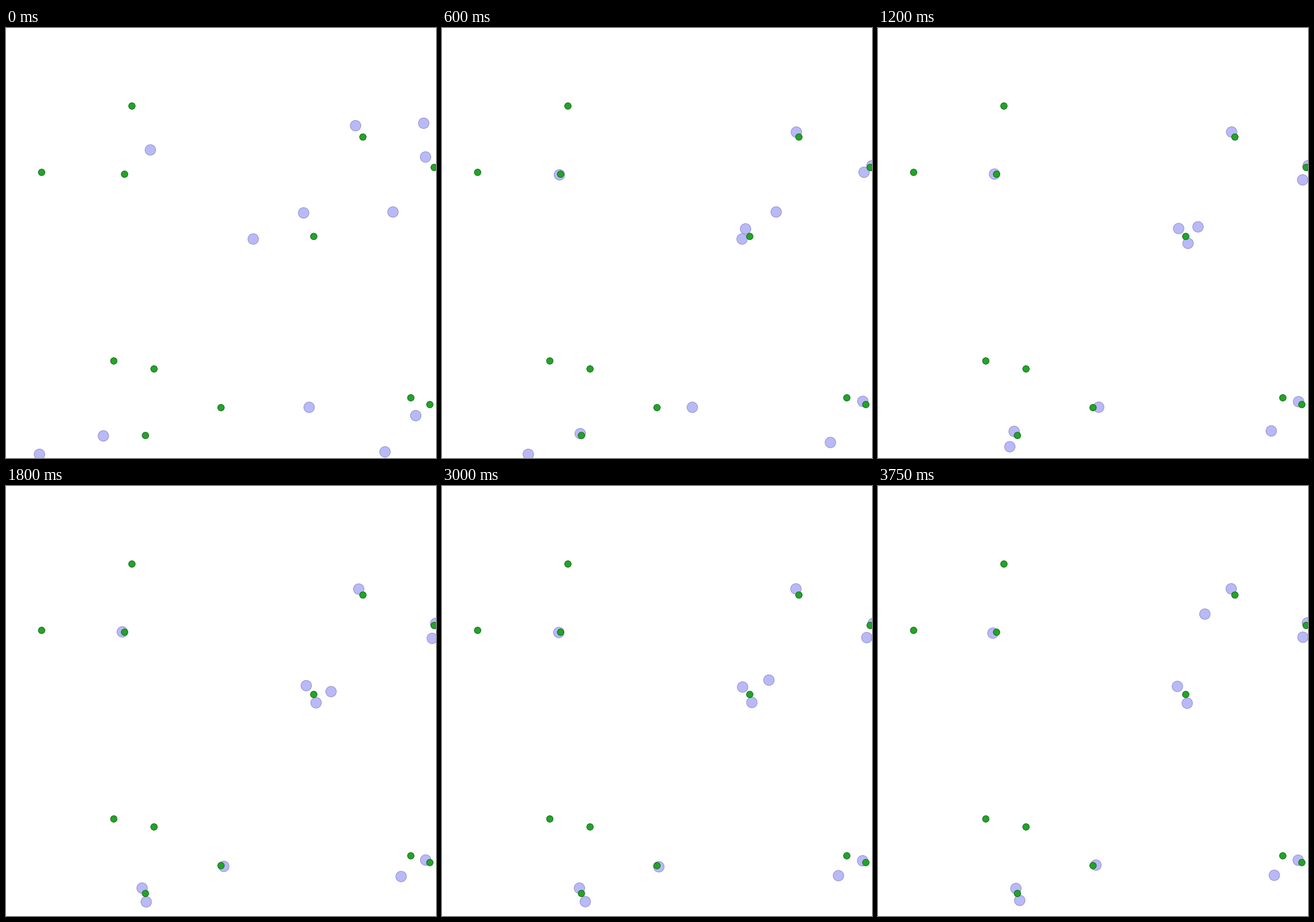
A matplotlib script for the animation above (3900 ms loop, 700 px wide and 700 px high).

```python
import math

import matplotlib.pyplot as plt
import numpy as np
from matplotlib.animation import FuncAnimation
from matplotlib.patches import Circle

SIZE = 700
FRAMES = 26
INTERVAL = 150
SPEED = 21.5    # pixels per step
SLOW = 5.4
CRUISE = 6      # most steps spent on one compass heading
PULL = 0.4      # share of the way to the resting place covered per step
WOBBLE = 0.8
DEPARTURE = 19  # step at which the restless agent sets off again

SITES = [(205, 127), (193, 238), (58, 235), (581, 177.5), (697, 227),
         (501, 339.3), (175.5, 542), (241, 555), (350, 618), (227, 663.3),
         (659, 602), (690, 613)]

# Start and resting place of each agent.
AGENTS = [
    ((569, 159), (575.7, 167.8)),
    ((680, 155), (693.5, 247.5)),
    ((683, 210), (699.3, 223)),
    ((235, 198.5), (189, 238)),
    ((484.5, 301), (488, 326)),
    ((402.5, 343.5), (504, 353)),
    ((493.5, 617.5), (354, 619)),
    ((667, 631), (684, 609)),
    ((158.5, 664), (223.5, 656)),
    ((54.5, 694), (232, 675.5)),
]
SLOW_AGENT = ((617, 690), (645.5, 634))
RESTLESS_AGENT = ((630, 299.5), (531, 337))
NEW_REST = (572, 186)

rng = np.random.default_rng(4)


def track(start, rest, steps=FRAMES - 1, speed=SPEED):
    """Head for the site by the rest along one of 8 compass headings,
    then ease into the rest and wobble there."""
    pos, rest = np.array(start, float), np.array(rest, float)
    site = np.array(min(SITES, key=lambda s: math.dist(s, rest)))
    dx, dy = site - pos
    angle = round(math.atan2(dy, dx) / (math.pi / 4)) * math.pi / 4
    heading = np.array([math.cos(angle), math.sin(angle)])
    ahead = min(CRUISE * speed, heading @ (site - pos))

    points = [pos]
    for _ in range(steps):
        move = min(speed, ahead)
        ahead -= move
        pos = pos + heading * move
        if move < speed:
            gap = rest - pos
            reach = min(speed - move, PULL * np.hypot(*gap))
            pos = pos + gap / max(np.hypot(*gap), 1e-6) * reach
            pos = pos + rng.normal(0, WOBBLE, 2)
        points.append(pos)
    return points


def dot(center, radius, fill, edge, z):
    return ax.add_patch(Circle(center, radius, facecolor=fill, edgecolor=edge,
                               linewidth=0.72, zorder=z))


tracks = [track(*agent) for agent in AGENTS]
tracks.append(track(*SLOW_AGENT, speed=SLOW))
restless = track(*RESTLESS_AGENT, steps=DEPARTURE)
restless += track(restless[-1], NEW_REST, FRAMES - 1 - DEPARTURE)[1:]
tracks.append(restless)

fig = plt.figure(figsize=(SIZE / 100, SIZE / 100), dpi=100, facecolor="white")
ax = fig.add_axes([0, 0, 1, 1])
ax.set_xlim(0, SIZE)
ax.set_ylim(SIZE, 0)
ax.axis("off")

agents = [dot(points[0], 8.6, "#b9b9f8", "#9494cc", 1) for points in tracks]
for site in SITES:
    dot(site, 5.3, "#22a428", "#176b1a", 2)


def update(step):
    for agent, points in zip(agents, tracks):
        agent.center = points[step]
    return agents


anim = FuncAnimation(fig, update, frames=FRAMES, interval=INTERVAL,
                     repeat=True, repeat_delay=0, blit=False)
plt.show()
```
